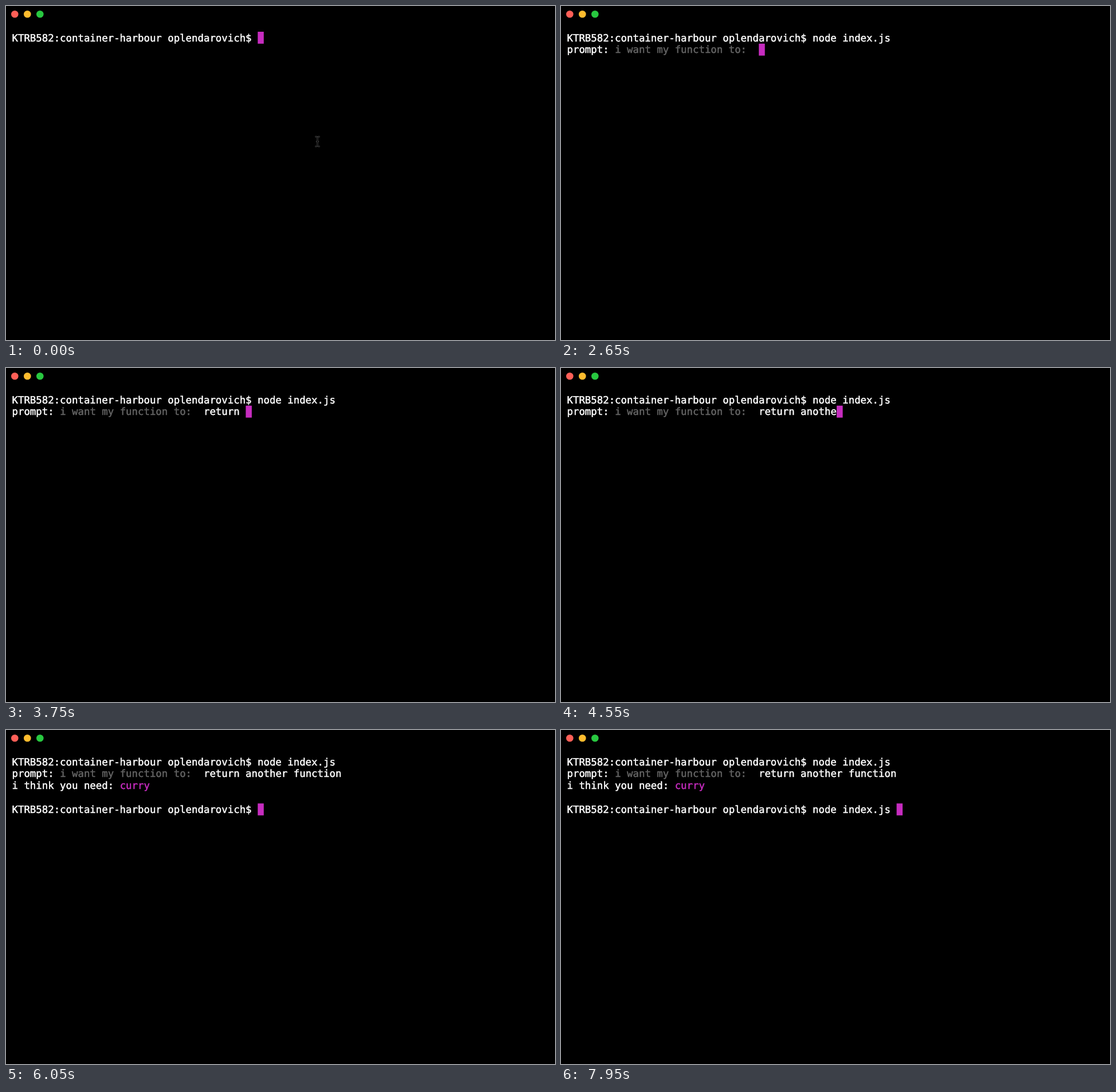
Animation of 958 by 584 pixels, one loop 8 s. Source, as an HTML page:

```html
<!DOCTYPE html>
<html lang="en">
<head>
<meta charset="utf-8">
<title>Terminal session</title>
<style>
  html, body { margin: 0; width: 100%; height: 100%; overflow: hidden; background: #000; }
  svg { display: block; width: 958px; height: 584px; }
  text {
    font: 17.36px "DejaVu Sans Mono", monospace;
    font-variant-ligatures: none;
    white-space: pre;
    text-rendering: geometricPrecision;
    stroke-width: .5;
  }
</style>
</head>
<body>
<svg viewBox="0 0 958 584">
  <defs>
    <path id="beam" d="M540.5 228.5Q543 228.5 543.5 231Q544 228.5 546.5 228.5M540.5 245.5Q543 245.5 543.5 243Q544 245.5 546.5 245.5M543.5 231V243M542 237H545"/>
  </defs>
  <rect width="958" height="584" fill="#000"/>
  <circle cx="15.3" cy="14.2" r="6.3" fill="#ff5f57"/>
  <circle cx="37.3" cy="14.2" r="6.3" fill="#febc2e"/>
  <circle cx="59.3" cy="14.2" r="6.3" fill="#28c840"/>
  <rect id="caret" width="10.5" height="20.9" fill="#c62cbf"/>
  <g id="screen"></g>
  <g id="mouse" fill="none" stroke-linecap="round">
    <use href="#beam" stroke="#4a4a4a" stroke-width="2.4"/>
    <use href="#beam" stroke="#000" stroke-width="1"/>
  </g>
</svg>
<script>
const LOOP = 8000;
const LEFT = 10.5, TOP = 45, CELL = 10.451, LINE = 20.85, BASE = 16.5;
const WHITE = '#fff', GRAY = '#646464', PINK = '#c62cbf';

const SHELL = 'KTRB582:container-harbour oplendarovich$ ';
const QUESTION = 'i want my function to:';
const COMMAND = 'node index.js ';
const ANSWER = 'return another function';

// Key times in ms
const FIRST_RUN = 100, ENTER = 1300, ASK = 1600, RESULT = 6000, SECOND_RUN = 6750;

const $ = id => document.getElementById(id);
const screen = $('screen'), caret = $('caret'), mouse = $('mouse');

// Number of keys pressed in a burst of n keys
const keys = (t, start, step, n) =>
  Math.max(0, Math.min(n, Math.floor((t - start) / step) + 1));

// Six typed letters, then tab completes the file name
function command(t, start) {
  return t >= start + 650 ? COMMAND : COMMAND.slice(0, keys(t, start, 100, 6));
}

function answer(t) {
  const n = keys(t, 2950, 115, 7) + keys(t, 3850, 120, 11) + keys(t, 5220, 100, 5);
  return ANSWER.slice(0, n);
}

// Each line is a list of [text, colour] runs
function session(t) {
  const lines = [[[SHELL + command(t, FIRST_RUN), WHITE]]];
  if (t >= ENTER) {
    lines.push(t < ASK ? [] : [
      ['prompt: ', WHITE], [QUESTION, GRAY], ['  ' + answer(t), WHITE]
    ]);
  }
  if (t >= RESULT) {
    lines.push(
      [['i think you need: ', WHITE], ['curry', PINK]],
      [],
      [[SHELL + command(t, SECOND_RUN), WHITE]]
    );
  }
  return lines;
}

function lineSvg(runs, row) {
  const spans = runs.map(([text, color]) =>
    `<tspan fill="${color}" stroke="${color}">${text}</tspan>`).join('');
  return `<text x="${LEFT}" y="${TOP + BASE + row * LINE}">${spans}</text>`;
}

let shown = '';
function draw(t) {
  const lines = session(t);
  const markup = lines.map(lineSvg).join('');
  if (markup !== shown) screen.innerHTML = shown = markup;

  const row = lines.length - 1;
  const col = lines[row].reduce((n, [text]) => n + text.length, 0);
  caret.setAttribute('x', LEFT + .3 + col * CELL);
  caret.setAttribute('y', TOP + row * LINE);
  mouse.style.display = t < FIRST_RUN ? '' : 'none';
}

const begin = performance.now();
function tick() {
  draw((performance.now() - begin) % LOOP);
  requestAnimationFrame(tick);
}
tick();
</script>
</body>
</html>
```
